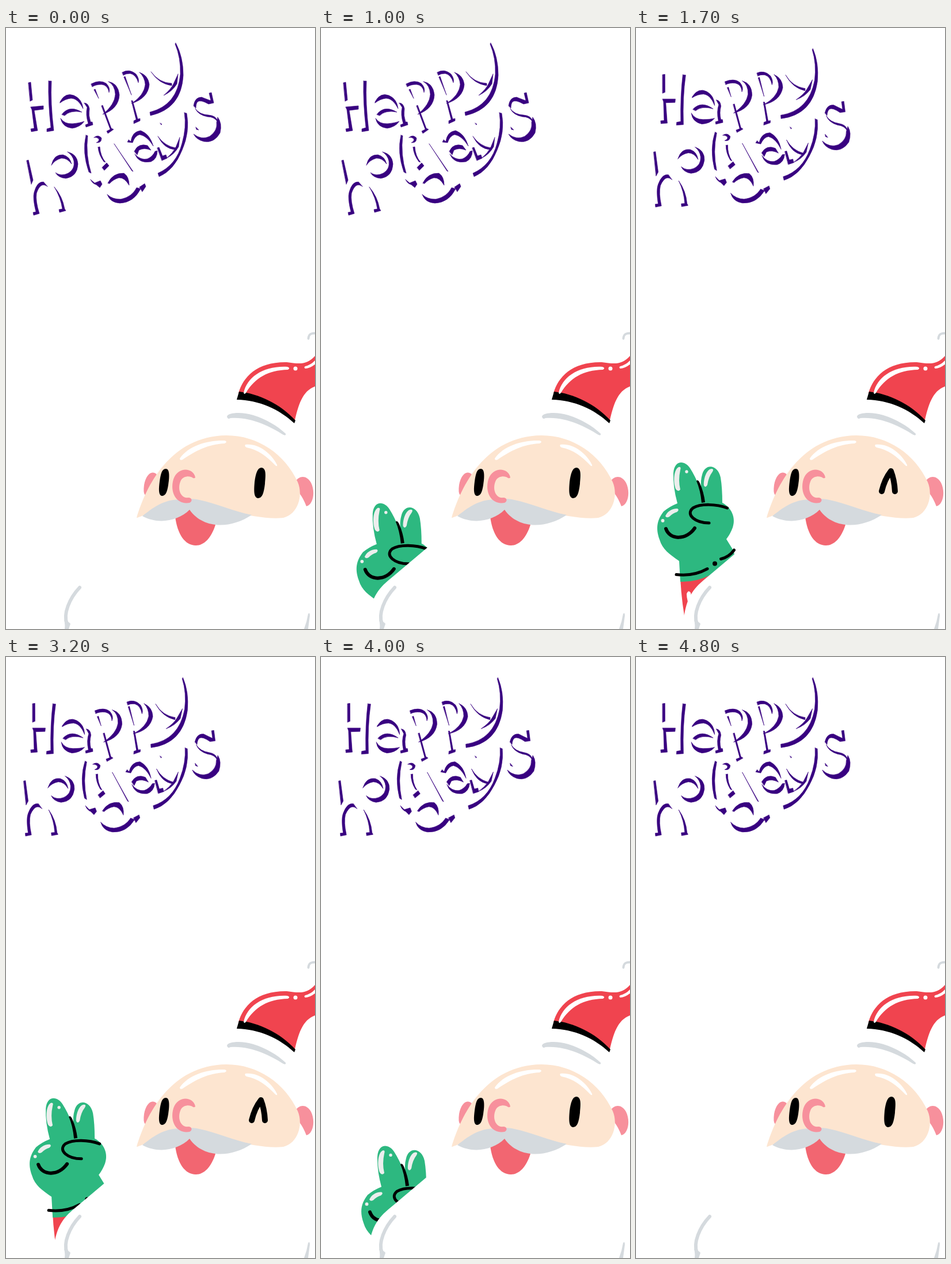
Animation, 537 px wide and 1043 px high, one loop 5800 ms. Source, as an HTML page with a canvas:

```html
<!DOCTYPE html>
<html lang="en">
<head>
<meta charset="utf-8">
<title>Happy holidays</title>
<style>
html, body { margin: 0; width: 100%; height: 100%; overflow: hidden; background: #fff; }
canvas { display: block; width: 100%; height: 100%; }
</style>
</head>
<body>
<canvas id="stage" width="537" height="1043"></canvas>
<script>
const ctx = document.getElementById('stage').getContext('2d');
const LOOP = 5800;
const PURPLE = '#380080', RED = '#f0444f', GREY = '#d5dade', SKIN = '#fde5d0';
const PINK = '#f7909c', MOUTH = '#f26671', GREEN = '#2db880', SHINE = '#eceeed';

function fill(color, d) {
  ctx.fillStyle = color;
  ctx.fill(new Path2D(d));
}

function line(color, width, d) {
  ctx.strokeStyle = color;
  ctx.lineWidth = width;
  ctx.stroke(new Path2D(d));
}

function dot(color, x, y, r) {
  ctx.fillStyle = color;
  ctx.beginPath();
  ctx.arc(x, y, r, 0, Math.PI * 2);
  ctx.fill();
}

// Only the shaded sides of each letter are visible.
const letters = [
  // H a p p y
  'M39 95L43 94L46 125L42 127Z M43 137L65 135L65 141L49 143L54 173L55 178L44 180L43 175L49 174L45 142Z M74 92L79 92Q77 130 83 178L71 180L71 175L78 173Q73 130 74 92Z',
  'M94 128Q103 111 118 117Q132 123 134 140Q125 122 113 122Q103 123 94 130Z M97 150Q110 133 132 146Q112 142 102 152Z M95 157Q102 167 116 166Q128 165 136 162Q129 172 115 174Q98 172 95 157Z M136 130Q143 130 145 140Q143 152 147 163L150 163L151 168L139 172L138 168L143 166Q138 150 141 138Z',
  'M148 97Q163 89 174 96Q182 104 179 112Q177 99 166 98Q156 98 150 102Z M153 107L155 106L161 122Z M166 135L168 134L183 174L187 176L177 183L175 179L181 176Z M178 93Q195 96 197 116Q196 140 168 150Q189 133 190 115Q189 99 178 93Z',
  'M202 77Q214 70 226 80Q232 88 230 95Q226 81 216 79Q208 79 204 82Z M205 85L207 84L218 116Z M218 126L220 126L229 158L233 157L233 161L222 166L222 161L226 159Z M232 77Q247 82 249 98Q247 122 218 131Q240 117 242 98Q241 85 232 77Z',
  'M295 26Q308 50 308 82Q305 140 251 152L250 146Q298 134 303 80Q304 52 294 28Z M252 76Q266 95 288 96L288 100Q266 97 252 76Z M299 80L297 97Q289 110 274 117Q287 106 291 97Z',
  // h o l i d a y s
  'M36 230L39 229L47 264L44 271Z M72 275Q60 266 53 287Q51 300 58 322L48 325L47 320L52 319Q46 295 49 285Q54 266 65 267Z M84 276Q98 292 102 314L104 317L93 320L92 315L98 314Q95 294 84 276Z',
  'M107 215Q124 219 125 236Q124 258 104 261Q91 260 86 251Q96 258 108 252Q120 245 118 231Q116 221 107 215Z M79 238Q83 219 99 220Q111 223 114 236Q106 225 96 226Q85 229 79 238Z',
  'M139 186L142 187Q138 220 148 252L144 250Q132 216 139 186Z M147 263L154 269L164 265L167 271L163 277L157 272Q150 270 147 263Z',
  'M153 190Q160 184 166 191Q166 200 157 199Q163 196 161 192Q157 189 153 190Z M160 207L163 206Q164 222 173 233L170 232Q161 220 160 207Z M167 242L175 234L179 239L171 247Z',
  'M188 201L221 249L219 248Z M177 269Q186 251 205 252Q214 258 214 273Q206 259 196 260Q186 263 180 270Z M176 289Q186 298 200 297Q219 293 227 277L234 279Q222 303 198 304Q181 303 176 289Z M232 276L241 270L243 275L237 284Z',
  'M217 197Q219 180 234 178Q250 184 256 205Q245 187 232 185Q224 187 220 199L211 198L213 194Z M223 214Q230 199 246 204L252 212Q240 207 231 212L228 220Z M224 219Q234 230 246 227Q255 223 259 214L263 213Q263 227 252 232Q231 236 224 219Z M263 208L266 207L272 222L278 220L280 226L271 230Z M268 165L271 167L270 168Z',
  'M310 147L314 148Q320 180 306 212Q292 247 266 258L264 252Q296 238 306 200Q314 172 310 147Z M264 188Q276 205 295 208L294 211Q275 210 264 188Z M302 190L300 206Q293 219 279 226Q290 217 295 207Z',
  'M326 135Q328 120 340 120Q350 124 356 126L353 113L357 112L361 130L352 132Q338 124 333 128Q330 131 330 139Z M329 140Q336 150 352 151Q366 152 368 163Q362 154 350 154Q334 151 329 140Z M368 155Q376 165 372 182Q362 200 344 197Q331 194 326 184Q340 195 354 188Q368 178 366 164Z M330 172L335 177L331 176Z'
].join(' ');

function drawGreeting(tilted) {
  ctx.save();
  if (tilted) {
    ctx.translate(194, 166);
    ctx.rotate(0.0925);
    ctx.translate(-194, -166);
  }
  fill(PURPLE, letters);
  line(PURPLE, 0.6, letters);
  ctx.restore();
}

// step 0 is fully raised, 16 is fully hidden behind the arm
function drawHand(step) {
  ctx.save();
  ctx.translate(4.13 * step, 11.8 * step);
  // sleeve
  fill(RED, 'M77 955L135 940L135 1060L92 1060Q80 1010 77 955Z');
  fill('#fff', 'M88 982Q91 974 95 980Q96 990 103 1000L95 1008Q88 994 88 982Z');
  // mitten
  fill(GREEN, 'M72 825Q64 796 65 772C67 749 85 750 94 764Q103 778 110 796L113 797Q112 785 115 775C120 755 142 757 147 780Q150 798 150 824C166 832 174 850 168 867Q164 878 157 887L170 908L171 914L130 949Q104 962 77 961L75 925C58 913 46 905 41 888C33 866 38 852 48 839Q59 830 72 825Z');
  fill(SHINE, 'M74 762C66 766 64 786 69 800Q73 806 77 801Q73 785 77 767Q79 761 74 762Z');
  fill(SHINE, 'M131 765C122 766 117 784 118 794Q121 799 124 793Q126 779 133 770Q136 765 131 765Z');
  fill(SHINE, 'M72 834C61 834 54 840 51 847Q53 851 58 848Q64 842 71 840Q76 836 72 834Z');
  dot(SHINE, 88, 770, 2.7);
  dot(SHINE, 46.5, 855, 2.9);
  fill('#000', 'M105 786Q108 783 111 790Q118 806 120 823L114 824Q112 802 105 786Z');
  line('#000', 5, 'M158.500 833C140 826 112 825 99 833C85 845 104 859 127 859');
  line('#000', 6, 'M52 869C59 889 87 889 102 868');
  line('#000', 5, 'M70 948.500Q100 952 124 938.500M147.500 921.500Q162 918 170.500 906');
  dot('#000', 137, 929.500, 4);
  ctx.restore();
  // white arm in front of the hand
  fill('#fff', 'M84 1018C90 985 100 972 125 952L188 899L250 846V1043H84Z');
}

function drawBody() {
  line(GREY, 6, 'M128 971C110 990 99 1017 106 1034');
  fill(GREY, 'M101 1027Q103 1036 102 1043L109 1043L112 1034Q109 1030 105 1030Z');
  fill(GREY, 'M525 1017Q528 1013 528 1020L525 1043H518Q523 1030 525 1017Z');
}

function drawHat() {
  line(GREY, 4, 'M525.500 539C526 531 531 529 539 530');
  fill(RED, 'M404 634C412 605 437 579 488 580C510 583 523 585 537 569V622C515 630 508 654 501 685Q456 641 404 634Z');
  fill('#000', 'M405 631C440 635 476 652 503 681L501 686C474 661 440 646 401 645Z');
  fill('#fff', 'M413 633C419 606 447 586 489 588Q495 590 490 593C455 594 433 607 417 633Q414 637 413 633Z');
  dot('#fff', 503, 591, 3.5);
  fill('#fff', 'M520 587Q530 585 538 576V583Q528 591 520 591Q517 589 520 587Z');
  fill(GREY, 'M384 674C387 667 410 666 430 672C452 679 471 690 486 704Q487 708 482 706C459 691 424 674 390 677Q385 680 384 674Z');
}

function drawFace(wink) {
  fill(PINK, 'M262 775C253 766 243 776 240 793Q238 807 242 811Q250 800 262 775Z');
  fill(PINK, 'M503 787C509 777 522 775 530 789C538 805 534 827 522 830Q517 817 511 809Z');
  fill(SKIN, 'M227 850C243 796 285 708 383 707C438 707 485 740 507 788C517 812 507 844 482 850C455 853 420 845 400 842L300 845L238 846Q231 849 227 850Z');
  fill('#fff', 'M302 747C317 725 350 715 380 716Q386 718 380 721C352 722 329 734 307 749Q302 751 302 747Z');
  fill('#fff', 'M416 723C437 720 461 737 471 758Q472 762 468 759C453 743 438 732 418 728Q414 726 416 723Z');
  fill(MOUTH, 'M294 848L318 832L364 862C357 885 344 898 330 898C311 898 298 879 294 848Z');
  fill(GREY, 'M237 847C255 833 273 818 304 818Q312 816 318 818Q325 816 336 819C365 825 396 839 427 845C388 871 341 868 319 836C299 856 264 862 237 847Z');
  fill(PINK, 'M329 780C326 763 299 760 291 783C284 807 297 828 319 824C325 821 323 815 317 815C303 817 297 799 304 785C309 777 320 777 325 781Q328 782 329 780Z');
  fill('#000', 'M278 765C285 765 284 781 282 793C280 806 277 812 271 812C264 811 266 796 267 787C269 773 271 765 278 765Z');
  if (wink) {
    line('#000', 10, 'M427 804Q432 783 443 769Q449 784 450 804');
  } else {
    fill('#000', 'M444 763C453 764 451 778 450 791C448 808 445 816 438 816C430 815 431 801 432 788C434 773 437 763 444 763Z');
  }
}

// The hand moves one step every 100 ms, pausing near the top.
function handStep(t) {
  if (t < 1600) return 16 - Math.floor(t / 100);
  if (t < 1700) return 1;
  if (t < 3200) return 0;
  if (t < 3400) return 1;
  return Math.min(16, Math.floor(t / 100) - 32);
}

function draw(t) {
  ctx.fillStyle = '#fff';
  ctx.fillRect(0, 0, 537, 1043);
  ctx.lineCap = ctx.lineJoin = 'round';
  drawGreeting(t >= 1500 || Math.floor(t / 500) === 1);
  const step = handStep(t);
  if (step < 16) drawHand(step);
  drawBody();
  drawHat();
  drawFace(t >= 1500 && t < 3500);
}

const start = performance.now();
function tick() {
  draw((performance.now() - start) % LOOP);
  requestAnimationFrame(tick);
}
tick();
</script>
</body>
</html>
```
